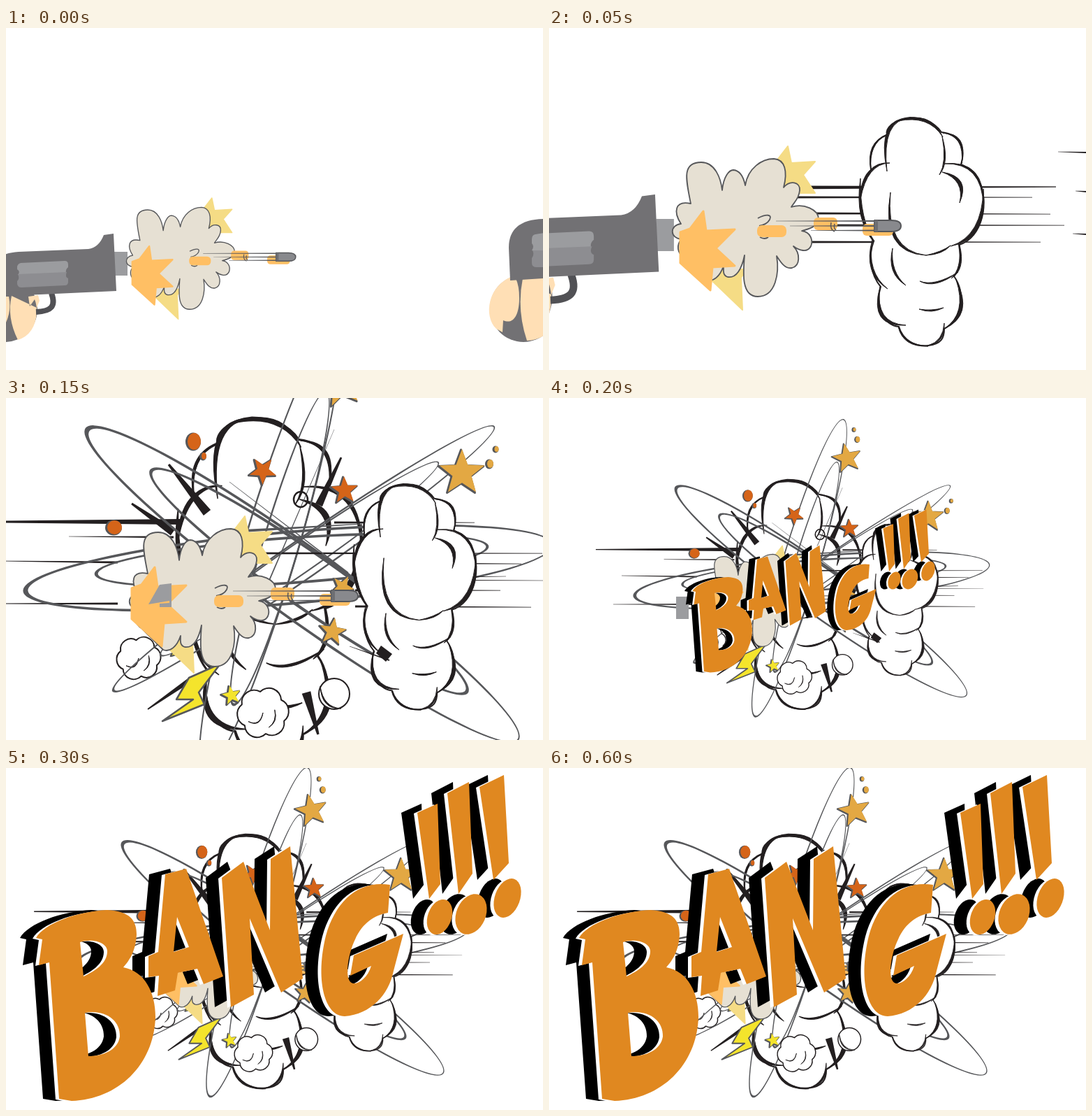
Write an HTML page with a canvas that moves like this. It is 769 px wide and 489 px high and loops after 0.8 s.

```html
<!DOCTYPE html>
<html lang="en">
<head>
<meta charset="utf-8">
<title>Bang</title>
<style>
html, body { margin: 0; width: 100%; height: 100%; overflow: hidden; background: #fff; }
canvas { display: block; }
</style>
</head>
<body>
<canvas id="stage" width="769" height="489"></canvas>
<script>
const ctx = document.getElementById('stage').getContext('2d');
const INK = '#231f20', STEEL = '#56575a', BODY = '#727174', LIGHT = '#9b9c9f', SKIN = '#ffdfb5',
  SMOKE = '#e6e0d3', FLAME = '#ffbf64', PALE = '#f5dc85', RUST = '#d56419', GOLD = '#e3a843',
  LEMON = '#f4e42c', BANG = '#e08820';

// ---- helpers ----
function shape(d, fill, stroke, width = 2) {
  const path = new Path2D(d);
  if (fill) { ctx.fillStyle = fill; ctx.fill(path, 'evenodd'); }
  if (stroke) { ctx.strokeStyle = stroke; ctx.lineWidth = width; ctx.stroke(path); }
}
function at(sx, sy, x, y, draw) {
  ctx.save();
  ctx.transform(sx, 0, 0, sy, x, y);
  draw();
  ctx.restore();
}
function oval(x, y, rx, ry, fill, stroke, angle = 0, width = 2) {
  ctx.beginPath();
  ctx.ellipse(x, y, rx, ry, angle, 0, 7);
  if (fill) { ctx.fillStyle = fill; ctx.fill(); }
  if (stroke) { ctx.strokeStyle = stroke; ctx.lineWidth = width; ctx.stroke(); }
}
function pill(x, y, w, h, r, fill) {
  ctx.beginPath();
  ctx.roundRect(x, y, w, h, r);
  ctx.fillStyle = fill;
  ctx.fill();
}
// Straight needle: w thick at the first end, pointed at the second.
function spike(x0, y0, x1, y1, w, fill = INK) {
  const len = Math.hypot(x1 - x0, y1 - y0), nx = (y0 - y1) / len * w / 2, ny = (x1 - x0) / len * w / 2;
  shape(`M${x0 + nx} ${y0 + ny}L${x1 + nx / 4} ${y1 + ny / 4}L${x1 - nx / 4} ${y1 - ny / 4}L${x0 - nx} ${y0 - ny}Z`, fill);
}
// Curved pen stroke that swells in the middle.
function brush(x0, y0, cx, cy, x1, y1, w) {
  const len = Math.hypot(x1 - x0, y1 - y0), nx = (y0 - y1) / len * w, ny = (x1 - x0) / len * w;
  shape(`M${x0} ${y0}Q${cx + nx} ${cy + ny} ${x1} ${y1}Q${cx - nx} ${cy - ny} ${x0} ${y0}Z`, INK, INK, 1);
}
// Ring whose line is heavier at one end of the long axis.
function orbit(cx, cy, rx, ry, deg, thin, thick) {
  ctx.save();
  ctx.translate(cx, cy);
  ctx.rotate(deg * Math.PI / 180);
  ctx.beginPath();
  ctx.ellipse(0, 0, rx, ry, 0, 0, 7);
  ctx.closePath();
  const inner = rx - (thin + thick) / 2, shift = (thick - thin) / 2;
  ctx.moveTo(inner + shift, 0);
  ctx.ellipse(shift, 0, inner, ry - (thin + thick) / 2.4, 0, 0, 7);
  ctx.fillStyle = STEEL;
  ctx.fill('evenodd');
  ctx.restore();
}
function star(x, y, r, fill, turn = 0) {
  let d = '';
  for (let i = 0; i < 10; i++) {
    const a = turn + i * Math.PI / 5, k = i % 2 ? r * .42 : r;
    d += `${i ? 'L' : 'M'}${x + k * Math.sin(a)} ${y - k * Math.cos(a)}`;
  }
  at(1, 1, -1.5, 1, () => shape(d + 'Z', STEEL, STEEL, 3));
  shape(d + 'Z', fill);
}
function dot(x, y, rx, ry, fill) {
  oval(x - 1, y + .5, rx + 1, ry + 1, STEEL);
  oval(x + .5, y, rx - .5, ry, fill);
}

// ---- parts ----
function gun() {
  oval(-2, 402, 47, 47, BODY);
  shape('M-9 384H4Q8 404 0 421L-9 425Z', SKIN);
  shape('M8 383Q1 414 17 446Q42 438 44 406Q44 395 41 388L34 398L32 384L46 382L48 390L44 400Z', SKIN);
  shape('M65 379C72 398 65 405 43 406', null, '#515155', 8);
  pill(155, 320, 19, 34, 0, LIGHT);
  shape('M-16 384V338Q-12 322 18 320L118 316Q133 314 140 296L154 294L158 376Z', BODY);
  shape('M21 336L84 333Q89 333 89 338V342Q85 345 86 350L17 353Q21 348 16 345V341Q17 337 21 336Z', LIGHT);
  shape('M17 352L87 349Q84 356 89 358V363Q89 368 84 368L22 371Q17 371 16 366V362Q20 358 17 352Z', '#8d8d91');
}
function farGun() {
  oval(741, 401, 48, 48, BODY);
  shape('M723 356C691 369 683 411 702 430L711 435L712 418C728 425 735 408 735 386Q735 369 730 358Z', SKIN);
  shape('M740 358Q731 403 746 447Q759 447 770 440V357Z', SKIN);
  shape('M770 273Q720 274 720 314L722 361L770 358Z', BODY);
  shape('M770 293L758 295Q753 296 753 302V308Q757 312 753 318H770Z', LIGHT);
  shape('M770 318H754Q757 324 753 329V336Q753 342 760 342H770Z', '#8d8d91');
}
function flame() {
  shape('M221 262L225 290L266 288L239 315L266 340L234 342L231 375L188 336V292L202 287Z', FLAME, FLAME, 3);
}
function shot(flameX = 0, flameY = 0) {
  ctx.lineJoin = 'round';
  shape('M318 200L342 169L347 193L381 191L364 210L381 236L350 236L325 244Z', PALE, PALE, 2);
  at(1, 1, flameX, flameY / 2, () => shape('M229 357L277 403L275 357L283 345H250Z', PALE, PALE, 2));
  shape('M190 302C173 301 172 282 189 280C178 263 180 246 203 251C196 216 190 192 218 192C238 192 246 215 248 232' +
    'C250 212 258 203 264 203C275 204 279 215 281 225C285 200 305 187 322 187C338 188 342 205 336 228' +
    'C345 217 360 220 359 232C358 245 350 250 347 256C365 250 386 260 386 273C386 284 370 288 362 290' +
    'C376 292 378 305 375 312C370 322 358 318 350 312C360 322 360 340 348 343C338 345 332 335 326 326' +
    'C330 350 325 384 299 384C275 384 278 350 280 325C276 345 268 358 256 356C248 354 250 345 250 340' +
    'C245 355 235 364 225 360L195 330C183 322 182 310 190 302Z', SMOKE, STEEL, 1.8);
  at(1, 1, flameX, flameY, flame);
  shape('M299 272C311 266 320 266 316 274Q312 281 301 283M302 299Q309 303 314 299', null, STEEL, 1.8);
  pill(298, 282, 42, 17, 7, FLAME);
  pill(379, 271, 34, 18, 6, FLAME);
  pill(449, 280, 44, 17, 6, FLAME);
  shape('M404 278Q402 288 409 291M409 280Q407 286 411 289', null, STEEL, 1.5);
  spike(465, 276, 325, 276, 2, STEEL);
  spike(465, 283, 345, 283, 2, STEEL);
  spike(465, 289.5, 375, 289.5, 2, STEEL);
  shape('M466 275H490Q504 275 504 283Q504 291 490 291H466Z', '#88898d', STEEL, 2);
  shape('M466 275H471V291H466Z', '#6d6e72');
}
function column() {
  shape('M484 153C464 160 458 181 461 203C444 217 441 259 453 283C457 296 462 301 465 305C457 326 460 352 475 370' +
    'C467 394 478 425 501 427C507 447 525 456 543 454C562 452 566 443 566 430C590 418 598 380 580 355' +
    'C590 343 590 328 587 310C622 300 631 246 615 218C609 207 602 201 590 195C597 174 589 152 562 149' +
    'C551 133 532 128 517 128C494 130 481 144 484 153Z', '#fff', INK, 2);
  [ [484, 205, 472, 128, 518, 129, 4], [500, 133, 545, 120, 564, 156, 4], [563, 155, 572, 192, 559, 210, 2],
    [484, 152, 455, 165, 461, 203, 2], [564, 150, 598, 152, 591, 194, 3], [488, 193, 453, 192, 446, 245, 3],
    [446, 215, 441, 275, 466, 305, 4], [566, 194, 623, 190, 622, 255, 3], [622, 230, 625, 300, 575, 312, 5],
    [563, 206, 600, 215, 588, 250, 5], [489, 235, 478, 320, 540, 325, 4], [540, 325, 563, 322, 575, 311, 2]
  ].forEach(b => brush(...b));
  [ [492, 315, 486, 350, 511, 368, 3], [463, 303, 452, 350, 485, 373, 3], [588, 310, 594, 345, 576, 358, 3],
    [586, 349, 552, 372, 531, 362, 2], [474, 370, 462, 425, 511, 425, 5], [583, 360, 604, 410, 566, 430, 5],
    [565, 400, 548, 407, 530, 402, 2], [500, 427, 508, 455, 543, 455, 2], [566, 422, 566, 449, 543, 454, 2]
  ].forEach(b => brush(...b));
}
function puff(x, y, r) {
  let d = '';
  for (let i = 0; i <= 6; i++) {
    const a = i * Math.PI / 3 + .4, px = x + r * .78 * Math.cos(a), py = y + r * .72 * Math.sin(a);
    d += i ? `A${r * .42} ${r * .42} 0 0 1 ${px} ${py}` : `M${px} ${py}`;
  }
  shape(d + 'Z', '#fff', INK, 2);
  brush(x - r * .5, y + r * .3, x - r * .1, y + r * .5, x, y, 1);
  brush(x + r * .2, y + r * .5, x + r * .5, y + r * .3, x + r * .4, y - r * .1, 1);
}
function blast() {
  spike(250, 177, -55, 177, 8);
  spike(240, 199, 90, 198, 3);
  spike(160, 235, 0, 233, 3);
  spike(160, 294, -18, 294, 3);
  puff(190, 372, 36);
  at(1.49, 1.5, 245 - 445 * 1.49, 28 - 128 * 1.5, column);
  spike(288, 164, 233, 95, 13);
  spike(448, 153, 480, 85, 11);
  spike(239, 192, 180, 151, 11);
  spike(430, 421, 447, 481, 13);
  spike(265, 402, 203, 445, 7);

  orbit(424, 266, 382, 52, 35.7, 2, 7);
  orbit(434, 262, 278, 40, 35, 5, 5);
  orbit(404, 243, 381, 53, -5, 2, 7);
  orbit(409, 232, 283, 34, -4, 4, 5);
  orbit(378, 217, 332, 40, -73.5, 2, 4);
  orbit(392, 215, 235, 27, -73.5, 2, 4);
  orbit(426, 230, 333, 28, -34.7, 2, 4);
  orbit(420, 230, 243, 22, -34.7, 2, 3);

  spike(330, 222, 768, 222, 3);
  spike(500, 236, 738, 237, 3);
  spike(500, 258, 716, 255, 3);
  spike(500, 260, 770, 261, 2);
  spike(500, 275, 708, 275, 3);
  spike(500, 298, 752, 299, 3);
  spike(470, 178, 671, 178, 3);
  spike(340, 190, 510, 180, 4, STEEL);
  spike(490, 250, 320, 120, 2, STEEL);
  spike(360, 300, 470, 45, 2, STEEL);
  oval(422, 145, 10, 11, null, INK, 0, 2.5);

  star(248, 360, 13, LEMON, .3);
  shape('M307 380L262 400L244 431H268L224 462L284 438L276 421Z', LEMON, STEEL, 2.5);
  at(.99, .988, 57, -3.5, column);
  spike(549, 375, 492, 355, 2);
  shape('M537 354L553 366L544 377L530 365Z', INK);
  star(482, 270, 17, GOLD, .5);
  shot(-8, -20);
  puff(368, 450, 42);
  oval(470, 423, 22, 22, '#fff', INK);
  brush(450, 412, 453, 444, 480, 444, 2);

  star(368, 104, 20, RUST, .65);
  star(485, 132, 20, RUST, -.05);
  star(653, 107, 34, GOLD);
  star(480, -18, 32, GOLD, -.2);
  star(468, 334, 20, GOLD, .15);
  star(323, 425, 14, LEMON, -.2);
  dot(269, 62, 10, 12, RUST);
  dot(283, 83, 4, 5, RUST);
  dot(155, 185, 11, 10, RUST);
  dot(693, 94, 5, 6, GOLD);
  dot(702, 73, 3.5, 4, GOLD);
  dot(502, -58, 5, 6, GOLD);
  dot(495, -79, 3.5, 4, GOLD);
}

const LETTERS = [
  'M43 243C55 222 102 205 145 203C178 205 187 218 187 238C186 261 177 275 168 285C199 291 214 321 214 356C212 425 160 474 94 476L76 473L62 278L47 282L52 245Z' +
    'M106 249C125 243 145 250 145 262C145 280 126 291 111 298ZM113 350C141 345 164 360 163 384C160 404 138 412 118 412Z',
  'M228 152L258 144L311 298L283 309L274 287L246 293L242 318L217 326L219 297L204 299V269L218 263ZM245 213L262 256L240 263Z',
  'M309 157L340 134L378 232L379 130L407 112L425 301L394 321L349 215L355 324L322 342Z',
  'M550 167C505 160 472 190 458 240C443 300 455 355 485 355C522 352 548 325 555 290L569 237L498 268L493 297L523 283C518 300 505 309 497 308C483 305 490 265 500 245C510 222 528 210 547 207Z',
  'M589 64L618 51L622 166L606 187Z', 'M632 36L663 20L668 151L648 180Z', 'M678 27L713 10L720 136L698 160Z'
].join('');

function word() {
  const layer = (x, y, color) => at(1, 1, x, y, () => {
    shape(LETTERS, color);
    oval(621, 213, 17, 26, color, null, .35);
    oval(666, 209, 21, 30, color, null, .4);
    oval(718, 186, 18, 29, color, null, .35);
  });
  layer(-23, 0, '#000');
  layer(-5, 1, '#fff');
  layer(0, 0, BANG);
}

// ---- poses ----
const POSES = [
  [50, () => {
    gun();
    farGun();
    at(1 / 1.35, 1 / 1.35, 56 / 1.35, 159 / 1.35, shot);
  }],
  [150, () => {
    [[345, 228, 726, 227, 5], [345, 242, 692, 242, 3], [370, 265, 718, 266, 3], [370, 282, 738, 282, 3],
      [360, 306, 704, 306, 3], [769, 178, 729, 177, 2], [769, 234, 754, 233, 2], [769, 295, 750, 294, 2]
    ].forEach(s => spike(...s));
    column();
    at(1.35, 1.35, -56, -159, gun);
    shot();
  }],
  [200, () => {
    at(1, 1, 0, 0, blast);
    at(1, 1, 0, 0, () => shape('M220 267L237 265V299H220V294L234 293V290L204 295Z', LIGHT));
  }],
  [300, () => {
    at(.673, .67, 104, 98, blast);
    pill(182, 284, 18, 32, 0, LIGHT);
    at(.5, .5, 184, 154.5, word);
  }],
  [800, () => {
    at(.743, .742, 81, 74, blast);
    shape('M190 284V305H172Z', LIGHT);
    word();
  }]
];

const start = performance.now();
function render() {
  const t = (performance.now() - start) % 800;
  ctx.fillStyle = '#fff';
  ctx.fillRect(0, 0, 769, 489);
  POSES.find(([end]) => t < end)[1]();
  requestAnimationFrame(render);
}
render();
</script>
</body>
</html>
```
